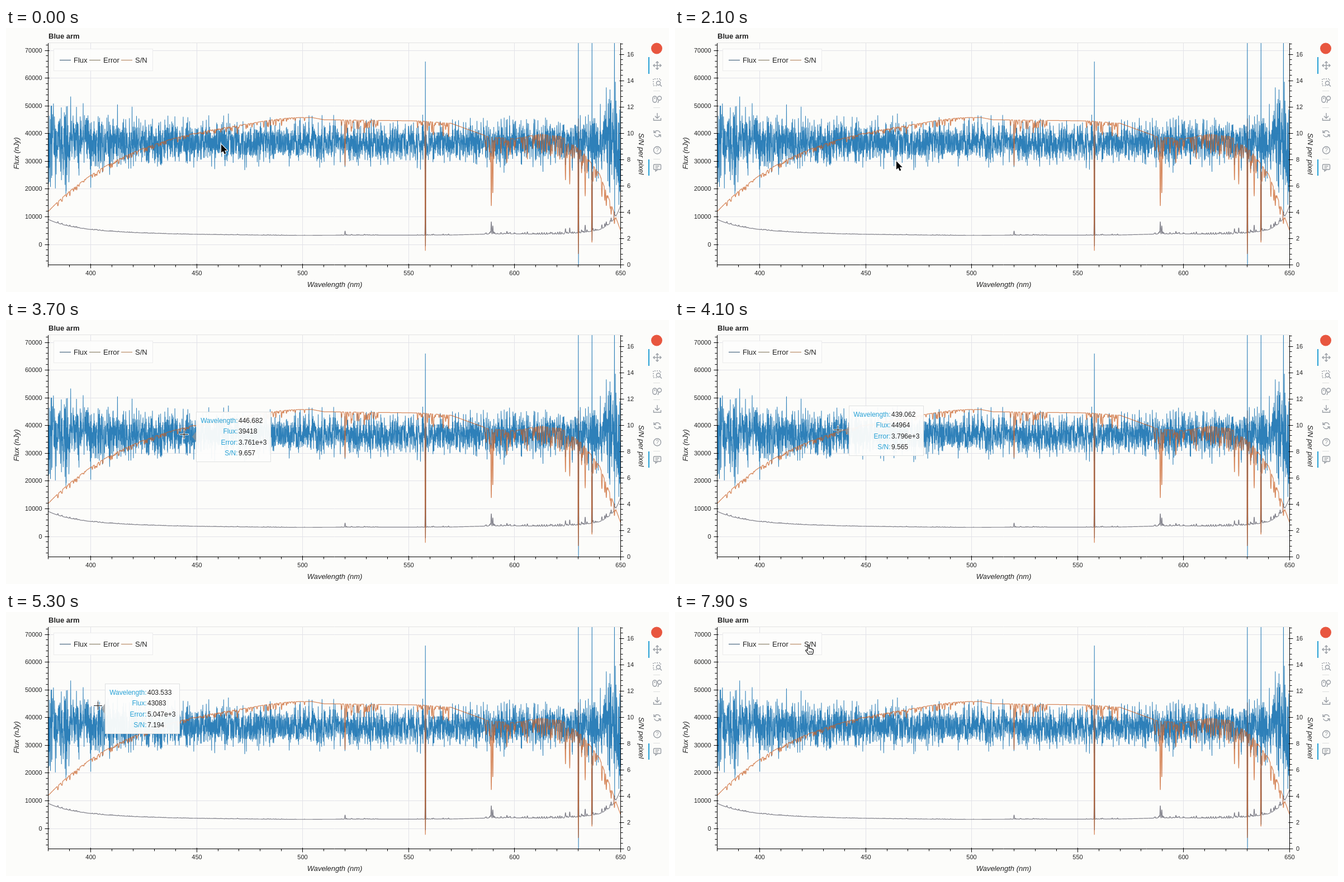
Animation of 1186x472 px, one loop 8 s. Source, as an HTML page with a canvas:

```html
<!DOCTYPE html>
<html lang="en">
<head>
<meta charset="utf-8">
<title>Blue arm spectrum</title>
<style>
  html, body { margin: 0; width: 1186px; height: 472px; overflow: hidden; background: #fcfcfa; }
  canvas { display: block; }
</style>
</head>
<body>
<canvas id="stage" width="1186" height="472"></canvas>
<script>
const W = 1186, H = 472, LOOP = 8000, STEP = 100;
const BOX = { l: 76, t: 27, r: 1099, b: 423 };
const FONT = '"Liberation Sans", Arial, Helvetica, sans-serif';
const ctx = document.getElementById('stage').getContext('2d');

const nmToX = nm => 75.8 + (nm - 380) * 3.791;
const fluxToY = f => 387 - f * 0.004957;
const snToY = s => 423 - s * 23.5;
const lerp = (a, b, u) => a + (b - a) * u;

function makeRandom(seed) {
  return () => {
    seed = (seed + 0x6D2B79F5) | 0;
    let t = Math.imul(seed ^ (seed >>> 15), 1 | seed);
    t = (t + Math.imul(t ^ (t >>> 7), 61 | t)) ^ t;
    return ((t ^ (t >>> 14)) >>> 0) / 4294967296;
  };
}
const random = makeRandom(58);
const gauss = () => Math.sqrt(-2 * Math.log(1 - random())) * Math.cos(2 * Math.PI * random());

// Values of a [time, ...values] track, held before its first and after its last key.
function sample(track, t, ease = u => u) {
  let k = 0;
  while (k < track.length - 2 && t >= track[k + 1][0]) k++;
  const a = track[k], b = track[k + 1];
  const u = ease(Math.max(0, Math.min(1, (t - a[0]) / (b[0] - a[0]))));
  return { values: a.map((v, i) => lerp(v, b[i], u)), u };
}
const smooth = u => u * u * (3 - 2 * u);

// ---------- spectrum model ----------
const MEAN_FLUX = 36700, COUNT = 3850;
const nmAt = i => 380 + 270 * i / (COUNT - 1);
const indexAt = nm => Math.round((nm - 380) / 270 * (COUNT - 1));

const redSide = [
  [504, 11.2], [510, 11.02], [555, 10.93], [570, 10.75], [588, 9.7], [600, 9.57],
  [612, 9.92], [622, 9.75], [632, 8.6], [640, 6.9], [645, 4.8], [650, 2.6]
];
function snBase(nm) {
  if (nm >= 504) return sample(redSide, nm).values[1];
  return 11.55 - 7.5 * Math.exp((380 - nm) / 44) + 0.17 * Math.exp(-(((nm - 492) / 15) ** 2));
}

// Absorption bands: from, to, number of dips, greatest depth
const bands = [
  [380, 480, 150, 0.38], [466, 470, 6, 0.7], [481, 501, 22, 0.55], [518, 536, 28, 1],
  [554, 570, 22, 1.1], [586, 600, 22, 2], [600, 632, 70, 1.8], [632, 648, 24, 1.3]
];
// Night-sky lines: wavelength, S/N at the bottom, highest and lowest flux as y
const skyLines = [
  [520, 7.5], [557.9, 1.05, 60, 390], [589, 4.4], [589.7, 5.4], [624, 6.4], [626, 6.1],
  [630.1, 0.75, 10, 440], [633.3, 5.2], [636.5, 1.6, 10, 380], [647.1, 3.1, 10, 331]
];

const sn = Array.from({ length: COUNT }, (_, i) => snBase(nmAt(i)));
function addDip(nm, bottom, half) {
  const first = Math.max(0, indexAt(nm - half)), last = Math.min(COUNT - 1, indexAt(nm + half));
  for (let i = first; i <= last; i++) {
    const u = Math.min(1, Math.abs(nmAt(i) - nm) / half);
    sn[i] = Math.min(sn[i], lerp(bottom, snBase(nm), u * u));
  }
}
for (const [from, to, n, depth] of bands) {
  for (let k = 0; k < n; k++) {
    const nm = lerp(from, to, random());
    addDip(nm, snBase(nm) - depth * (0.15 + 0.85 * random() ** 2), 0.25);
  }
}
const flux = Array.from({ length: COUNT }, (_, i) => {
  const noise = Math.max(-3, Math.min(3, gauss()));
  return fluxToY(MEAN_FLUX * (1 + noise / Math.max(3.9, snBase(nmAt(i)))));
});
for (const [nm, bottom, high, low] of skyLines) {
  addDip(nm, bottom, 0.26);
  if (!high) continue;
  const i = indexAt(nm);
  flux[i] = high;
  flux[i + 1] = low;
}
const snLine = sn.map(snToY);
const errLine = sn.map(s => fluxToY(MEAN_FLUX / s));

// ---------- drawing helpers ----------
function line(c, color, width, ...points) {
  c.strokeStyle = color;
  c.lineWidth = width;
  c.beginPath();
  points.forEach(([x, y], i) => i ? c.lineTo(x, y) : c.moveTo(x, y));
  c.stroke();
}
function text(c, str, x, y, { size = 11, style = '', align = 'left', color = '#222', turn = 0 } = {}) {
  c.save();
  c.translate(x, y);
  c.rotate(turn);
  c.font = `${style} ${size}px ${FONT}`;
  c.textAlign = align;
  c.fillStyle = color;
  c.fillText(str, 0, size * 0.36);
  c.restore();
}
function panel(c, x, y, w, h, fill, edge) {
  c.fillStyle = fill;
  c.fillRect(x, y, w, h);
  c.strokeStyle = edge;
  c.lineWidth = 1;
  c.strokeRect(x + 0.5, y + 0.5, w - 1, h - 1);
}
const series = (c, ys, color, width) => line(c, color, width, ...ys.map((y, i) => [nmToX(nmAt(i)), y]));
const crisp = v => Math.round(v - 0.5) + 0.5;

function drawGrid(c) {
  const grid = '#e2e2e8';
  for (let nm = 400; nm <= 600; nm += 50) {
    const x = crisp(nmToX(nm));
    line(c, grid, 1, [x, BOX.t], [x, BOX.b]);
  }
  for (let f = 0; f <= 70000; f += 10000) {
    const y = crisp(fluxToY(f));
    line(c, grid, 1, [BOX.l, y], [BOX.r, y]);
  }
  line(c, '#e3e3e3', 1, [BOX.l, BOX.t - 0.5], [BOX.r, BOX.t - 0.5]);
}

function drawAxes(c) {
  const ink = '#000', l = BOX.l - 0.5, r = BOX.r + 0.5, b = BOX.b + 0.5;
  line(c, ink, 1, [l, BOX.t], [l, b], [r, b], [r, BOX.t]);
  for (let f = -6000; f <= 72000; f += 2000) {
    const y = crisp(fluxToY(f)), major = f % 10000 === 0;
    line(c, ink, 1, [l - (major ? 6 : 4), y], [l + (major ? 2 : 0), y]);
    if (major) text(c, String(f), 64.5, y, { align: 'right' });
  }
  for (let k = 0; k <= 42; k++) {
    const y = crisp(snToY(k * 0.4)), major = k % 5 === 0;
    line(c, ink, 1, [r - (major ? 2 : 0), y], [r + (major ? 6 : 4), y]);
    if (major) text(c, String(k / 5 * 2), 1111, y);
  }
  for (let nm = 380; nm <= 650; nm += 10) {
    const x = crisp(nmToX(nm)), major = nm % 50 === 0;
    line(c, ink, 1, [x, b - (major ? 2 : 0)], [x, b + (major ? 6 : 4)]);
    if (major) text(c, String(nm), x, 438.5, { align: 'center' });
  }
  const label = { size: 13, style: 'italic', align: 'center' };
  text(c, 'Wavelength (nm)', 588, 458, label);
  text(c, 'Flux (nJy)', 18, 224, { ...label, turn: -Math.PI / 2 });
  text(c, 'S/N per pixel', 1137, 225, { ...label, turn: Math.PI / 2 });
  text(c, 'Blue arm', 76, 14.5, { size: 13, style: 'bold' });
}

function drawLegend(c) {
  panel(c, 85, 37, 178, 40, 'rgba(253,253,252,.95)', '#ececec');
  const items = [['Flux', 96, '#4a6780'], ['Error', 149, '#8a816a'], ['S/N', 206, '#b98a66']];
  for (const [name, x, color] of items) {
    line(c, color, 1.2, [x, 57.5], [x + 20, 57.5]);
    text(c, name, x + 25, 57.5, { size: 13 });
  }
}

function drawToolbar(c) {
  const gray = '#979ca3', active = '#26a0d5', x = 1165;
  const seg = (...p) => line(c, gray, 1.4, ...p.map(([dx, dy]) => [x + dx, dy]));
  const ring = (dx, y, r, a = 0, z = 7) => {
    c.beginPath();
    c.arc(x + dx, y, r, a, z);
    c.stroke();
  };
  const pill = (dx, y, w, h, r) => {
    c.beginPath();
    c.roundRect(x + dx, y, w, h, r);
    c.stroke();
  };
  c.fillStyle = '#e8563f';
  c.beginPath();
  c.arc(1164, 36.5, 10, 0, 7);
  c.fill();

  c.fillStyle = active;
  c.fillRect(1149, 52, 2, 30);
  c.fillRect(1149, 235, 2, 29);
  for (const y of [112, 142, 234]) line(c, '#dedfdf', 1, [1158, y + 0.5], [1170, y + 0.5]);

  // pan
  seg([-7, 67], [7, 67]);
  seg([0, 60], [0, 74]);
  for (const s of [-1, 1]) {
    seg([s * 4.5, 64.5], [s * 7, 67], [s * 4.5, 69.5]);
    seg([-2.5, 67 + s * 4.5], [0, 67 + s * 7], [2.5, 67 + s * 4.5]);
  }
  // box zoom
  c.setLineDash([2, 2]);
  seg([-1, 103], [-7, 103], [-7, 91], [6, 91], [6, 94]);
  c.setLineDash([]);
  ring(2, 98.5, 3.5);
  seg([4.5, 101], [8, 104.5]);
  // wheel zoom
  pill(-8, 122, 7, 11, 3.5);
  seg([-4.5, 124], [-4.5, 127]);
  ring(4, 125.5, 3.5);
  seg([3, 129], [1, 134]);
  // save
  seg([0, 152], [0, 161]);
  seg([-4, 157.5], [0, 161.5], [4, 157.5]);
  seg([-6.5, 161], [-6.5, 165], [6.5, 165], [6.5, 161]);
  // reset
  ring(0, 189, 5.5, 3.5, 6);
  ring(0, 189, 5.5, 0.35, 2.85);
  seg([-6, 183], [-6, 187], [-2, 187]);
  seg([6, 195], [6, 191], [2, 191]);
  // help
  ring(0, 218.5, 6.5);
  text(c, '?', x, 218.5, { size: 10, align: 'center', color: gray });
  // hover
  pill(-6.5, 244, 13, 9, 1.5);
  seg([-3, 253], [-3, 256], [1, 253]);
  seg([-3.5, 247], [3.5, 247]);
  seg([-3.5, 250], [1.5, 250]);
}

const plot = document.createElement('canvas');
plot.width = W;
plot.height = H;
(function drawPlot(c) {
  c.fillStyle = '#fcfcfa';
  c.fillRect(0, 0, W, H);
  drawGrid(c);
  c.save();
  c.beginPath();
  c.rect(BOX.l, BOX.t, BOX.r - BOX.l, BOX.b - BOX.t);
  c.clip();
  c.lineJoin = 'bevel';
  series(c, flux, 'rgba(31,119,180,.93)', 1.05);
  series(c, errLine, 'rgba(85,85,98,.75)', 1.2);
  series(c, snLine, 'rgba(200,92,32,.72)', 1.25);
  c.restore();
  drawAxes(c);
  drawLegend(c);
  drawToolbar(c);
})(plot.getContext('2d'));

// ---------- pointer and tooltip ----------
const HOVER = { from: 2700, to: 5600 };
// time, x, y
const pointerPath = [
  [0, 385, 208], [2100, 396, 238], [3100, 368, 219], [4100, 291, 196],
  [5300, 164, 167], [6500, 241, 68], [7900, 240, 67]
];
// time, wavelength, flux, error, S/N, anchor y
const readings = [
  [3100, 458.113, 32688, 3707, 9.795, 224.5],
  [4100, 439.062, 44964, 3796.2, 9.565, 198],
  [5300, 403.533, 43083, 5047.3, 7.194, 173]
];

function drawTooltip(t) {
  const { values: [, nm, mean, error, snr, cy], u } = sample(readings, t);
  const noise = Math.sin(Math.PI * u) * error * 1.6 * (makeRandom(t)() - 0.5);
  const rows = [
    ['Wavelength:', nm.toFixed(3)],
    ['Flux:', String(Math.round(mean + noise))],
    ['Error:', Number.isInteger(error) ? String(error) : error.toExponential(3)],
    ['S/N:', snr.toFixed(3)]
  ];
  ctx.font = `12px ${FONT}`;
  const width = Math.round(84 + Math.max(...rows.map(r => ctx.measureText(r[1]).width)));
  const x = Math.round(nmToX(nm) + 11.5), y = Math.round(cy - 45);
  ctx.fillStyle = 'rgba(144,149,153,.75)';
  ctx.beginPath();
  ctx.moveTo(x - 7, cy);
  ctx.lineTo(x, cy - 9);
  ctx.lineTo(x, cy + 9);
  ctx.fill();
  panel(ctx, x, y, width, 90, 'rgba(253,253,252,.95)', '#dfe1e1');
  rows.forEach(([name, value], i) => {
    const ry = y + 16 + i * 19.1;
    text(ctx, name, x + 74.5, ry, { size: 12, align: 'right', color: '#26a0d5' });
    text(ctx, value, x + 76, ry, { size: 12 });
  });
}

const arrowShape = new Path2D('M0 0V15L3.4 11.9L5.8 17.4L8.4 16.3L6 10.9H10.7Z');
const handShape = new Path2D('M-3 1V-6.5Q-3-8-1.7-8T-.4-6.5V-2Q2-3 2.4-1.4Q4.6-2 5-.4Q7.2-.8 7.4 1.2V4Q7.4 6 6 8.5H-1.6Q-3 5.8-5.6 3.2Q-7 1.4-5.4.8Q-4.4.5-3 2Z');
function drawPointer(x, y, kind) {
  ctx.save();
  ctx.translate(x, y);
  ctx.lineJoin = 'round';
  if (kind === 'cross') {
    for (const [color, width, reach] of [['rgba(255,255,255,.85)', 3, 8], ['#111', 1, 7]]) {
      line(ctx, color, width, [-reach, 0.5], [reach + 1, 0.5]);
      line(ctx, color, width, [0.5, -reach], [0.5, reach + 1]);
    }
  } else if (kind === 'hand') {
    ctx.fillStyle = '#fff';
    ctx.strokeStyle = '#111';
    ctx.lineWidth = 1.2;
    ctx.fill(handShape);
    ctx.stroke(handShape);
    for (const hx of [0, 2.2, 4.4]) line(ctx, '#111', 0.8, [hx, 3], [hx, 6]);
  } else {
    ctx.strokeStyle = '#fff';
    ctx.lineWidth = 2;
    ctx.stroke(arrowShape);
    ctx.fillStyle = '#000';
    ctx.fill(arrowShape);
  }
  ctx.restore();
}

function render(now) {
  const t = Math.floor(now % LOOP / STEP) * STEP;
  const [, px, py] = sample(pointerPath, t, smooth).values.map(Math.round);
  const hovering = t >= HOVER.from && t <= HOVER.to;
  const onLegend = px > 85 && px < 263 && py > 37 && py < 77;
  ctx.drawImage(plot, 0, 0);
  if (hovering) drawTooltip(t);
  drawPointer(px, py, hovering ? 'cross' : onLegend ? 'hand' : 'arrow');
}

const start = performance.now();
(function tick() {
  render(performance.now() - start);
  requestAnimationFrame(tick);
})();
</script>
</body>
</html>
```
